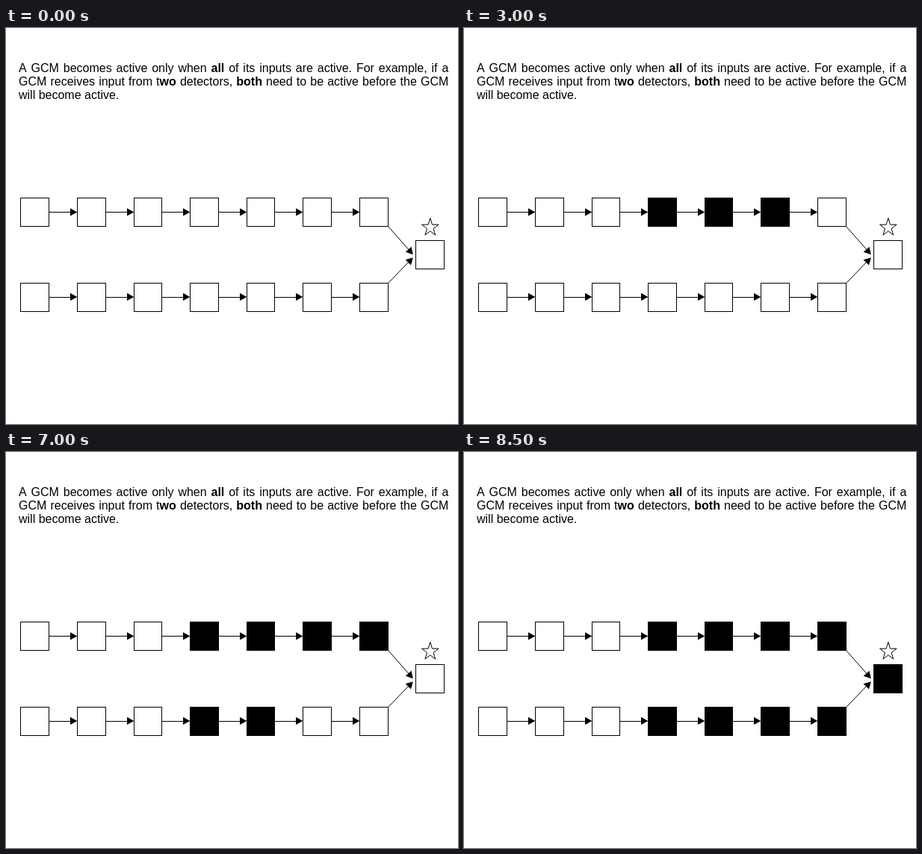
Write an HTML page with a canvas that moves like this. It is 605 px wide and 530 px high and loops after 9 s.

```html
<!DOCTYPE html>
<html lang="en">
<head>
<meta charset="utf-8">
<title>GCM activation</title>
<style>
  html, body { margin: 0; width: 100%; height: 100%; overflow: hidden; background: #fff; }
  canvas { display: block; }
</style>
</head>
<body>
<canvas id="stage" width="605" height="530"></canvas>
<script>
const ctx = document.getElementById('stage').getContext('2d');
const LOOP = 9000, STEP = 500, PITCH = 75.6;
const LEFT = 17, RIGHT = 592.3;

// Asterisks switch bold on and off.
const LINES = [
  'A GCM becomes active only when *all* of its inputs are active. For example, if a',
  'GCM receives input from t*wo* detectors, *both* need to be active before the GCM',
  'will become active.'
];

// Each row lights its cells from the fourth on, one per step.
const ROWS = [
  { top: 227, lineY: 246, headY: 246.4, start: 2000 },
  { top: 341, lineY: 360, headY: 359.9, start: 6500 }
];
const GOAL = { x: 548, y: 284, start: 8500 };

const STAR = [[.5, 0], [.617, .382], [1, .382], [.689, .621], [.806, 1],
              [.5, .768], [.194, 1], [.311, .621], [0, .382], [.383, .382]];

const setFont = bold => { ctx.font = (bold ? 'bold ' : '') + '16px "Liberation Sans", Arial, sans-serif'; };

function textLine(line, y, justify) {
  const parts = line.split('*');
  const run = (gap, draw) => {
    let x = LEFT;
    parts.forEach((part, i) => {
      setFont(i % 2);
      part.split(/( )/).forEach(word => {
        if (draw && word !== ' ') ctx.fillText(word, x, y);
        x += ctx.measureText(word).width + (word === ' ' ? gap : 0);
      });
    });
    return x;
  };
  const gap = justify ? (RIGHT - run(0, false)) / (line.split(' ').length - 1) : 0;
  run(gap, true);
}

function polygon(points) {
  ctx.beginPath();
  points.forEach(([x, y]) => ctx.lineTo(x, y));
  ctx.closePath();
}

function box(x, y, right, on) {
  if (on) ctx.fillRect(x, y, right - x + 1, 39);
  else ctx.strokeRect(x + .5, y + .5, right - x, 38);
}

function head(x, y, angle) {
  const c = Math.cos(angle), s = Math.sin(angle);
  polygon([[0, 0], [-9.3, -5.2], [-9.3, 5.2]].map(([u, v]) => [x + u * c - v * s, y + u * s + v * c]));
  ctx.fill();
}

function slant(x1, y1, x2, y2) {
  const angle = Math.atan2(y2 - y1, x2 - x1);
  ctx.beginPath();
  ctx.moveTo(x1, y1);
  ctx.lineTo(x2 - 5 * Math.cos(angle), y2 - 5 * Math.sin(angle));
  ctx.stroke();
  head(x2, y2, angle);
}

const cellLeft = i => Math.round(19.3 + PITCH * i);
const cellRight = i => Math.round(57 + PITCH * i);

function drawRow({ top, lineY, headY, start }, t) {
  for (let i = 0; i < 7; i++) {
    box(cellLeft(i), top, cellRight(i), i > 2 && t >= start + (i - 3) * STEP);
    if (i === 6) break;
    const from = cellRight(i), to = cellLeft(i + 1);
    ctx.fillRect(from, lineY, to - from - 4, 1);
    head(to + .3, headY, 0);
  }
}

function draw(t) {
  ctx.fillStyle = '#fff';
  ctx.fillRect(0, 0, 605, 530);
  ctx.fillStyle = ctx.strokeStyle = '#000';
  ctx.lineWidth = 1;

  LINES.forEach((line, i) => textLine(line, 59 + 18 * i, i < 2));
  ROWS.forEach(row => drawRow(row, t));
  slant(511.5, 265.5, 544.8, 303.2);
  slant(511.5, 341.5, 544.8, 307.2);
  box(GOAL.x, GOAL.y, GOAL.x + 38, t >= GOAL.start);

  polygon(STAR.map(([u, v]) => [556.5 + 22.6 * u, 254.5 + 22.6 * v]));
  ctx.stroke();
}

const begin = performance.now();
function frame() {
  draw((performance.now() - begin) % LOOP);
  requestAnimationFrame(frame);
}
frame();
</script>
</body>
</html>
```
